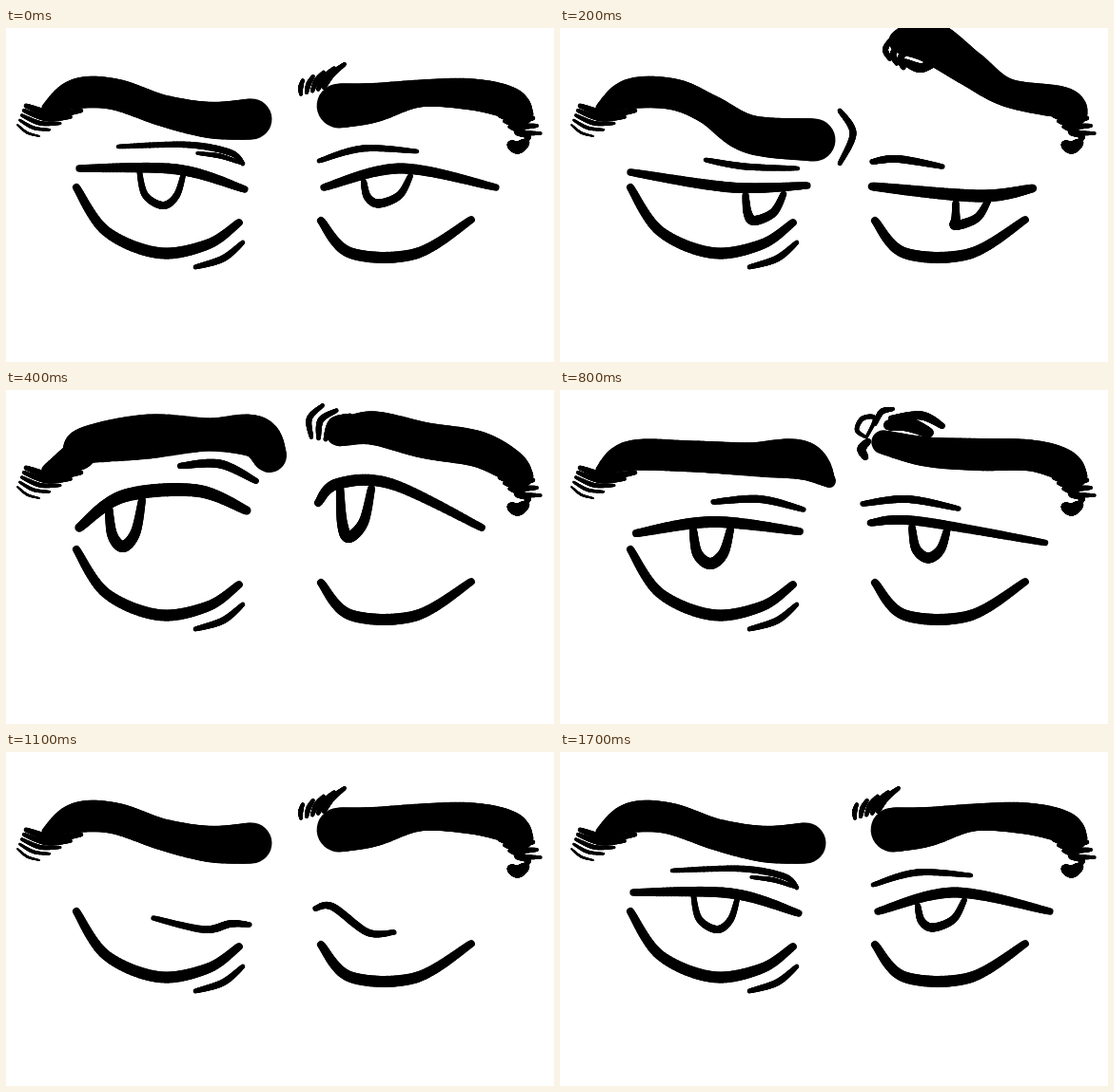
These frames come from a looping animation (576x352 px, 3600 ms). An HTML page with a canvas:

```html
<!DOCTYPE html>
<html lang="en">
<head>
<meta charset="utf-8">
<title>Expressive eyes</title>
<style>
html, body { margin: 0; width: 100%; height: 100%; overflow: hidden; background: #fff; }
canvas { display: block; width: 576px; height: 352px; }
</style>
</head>
<body>
<canvas id="stage" width="576" height="352"></canvas>
<script>
const ctx = document.getElementById('stage').getContext('2d');
const LOOP = 3600;
const STEPS = 60;

const lerp = (a, b, t) => a + (b - a) * t;

// Catmull-Rom curve through key points, sampled at even steps.
function curve(keys, dim) {
  const last = keys.length / dim - 1;
  const key = (i, d) => keys[Math.max(0, Math.min(last, i)) * dim + d];
  return Array.from({ length: STEPS + 1 }, (_, k) => {
    const u = k / STEPS * last, i = Math.min(Math.floor(u), last - 1), t = u - i;
    return Array.from({ length: dim }, (_, d) => {
      const a = key(i - 1, d), b = key(i, d), c = key(i + 1, d), e = key(i + 2, d);
      return b + t * ((c - a) / 2 + t * (a - 2.5 * b + 2 * c - e / 2 + t * (1.5 * (b - c) + (e - a) / 2)));
    });
  });
}

// Brush line that swells to `width` in the middle.
const brush = (width, ...keys) => curve(keys, 2).map(([x, y], k) =>
  [x, y, width * (0.65 + 0.35 * Math.sin(Math.PI * k / STEPS))]);

// Heavy line whose key points carry their own thickness.
const brow = (...keys) => curve(keys, 3);

// Brows keep their outer end, only the rest of the spine moves.
const browL = (...keys) => brow(42, 84, 8, 75, 69, 31, ...keys);
const browR = (...keys) => brow(...keys, 530, 79, 33, 547, 91, 15);

// Rounded U from the left rim over the bottom to the right rim.
function iris(width, lx, ly, bx, by, rx, ry) {
  return brush(width, lx, ly, lerp(lx, bx, 0.25), lerp(ly, by, 0.7), bx, by,
    lerp(rx, bx, 0.35), lerp(ry, by, 0.7), rx, ry);
}

// Bowed hatching between a first and a last stroke.
function fan(count, widths, first, last, bow) {
  return Array.from({ length: count }, (_, i) => {
    const t = i / (count - 1);
    const [x, y, x2, y2] = first.map((v, j) => lerp(v, last[j], t));
    const mx = (x + x2) / 2 + (y2 - y) * bow, my = (y + y2) / 2 - (x2 - x) * bow;
    return brush(lerp(widths[0], widths[1], t), x, y, mx, my, x2, y2);
  });
}

const fixed = [
  brush(12, 74, 168, 105, 214, 160, 237, 212, 228, 245, 205),
  brush(12, 331, 203, 362, 237, 430, 238, 489, 202),
  brush(7, 199, 252, 228, 243, 249, 226),
  ...fan(5, [2.5, 7], [12, 102, 35, 114], [21, 82, 79, 87], -0.1),
  ...fan(3, [7, 5], [519, 92, 554, 95], [529, 104, 562, 111], -0.08),
  brush(6, 551, 96, 537, 109, 549, 114, 543, 122),
  brush(13, 531, 123, 538, 126, 546, 121)
];

const calm = {
  brows: [
    browL(115, 70, 33, 165, 87, 33, 215, 97, 38, 258, 96, 43),
    browR(350, 82, 47, 385, 79, 42, 435, 69, 29, 490, 70, 33)
  ],
  tufts: fan(5, [5, 6], [310, 70, 312, 55], [334, 63, 356, 38], 0.08)
};

const rest = {
  ...calm,
  lids: [brush(11, 77, 148, 180, 149, 251, 170), brush(11, 334, 168, 415, 148, 515, 168)],
  irises: [iris(8, 140, 150, 165, 187, 187, 152), iris(9, 376, 162, 392, 185, 425, 156)],
  creases: [
    brush(7, 118, 125, 190, 123, 235, 131, 249, 143),
    brush(7, 329, 140, 375, 127, 432, 130),
    brush(5, 201, 132, 225, 135, 246, 142)
  ]
};

const suspicious = {
  brows: [
    browL(120, 70, 33, 157, 86, 32, 200, 112, 40, 267, 118, 45),
    browR(358, 14, 24, 388, 14, 44, 430, 42, 38, 470, 68, 30)
  ],
  tufts: [
    ...fan(3, [6, 7], [347, 13, 347, 33], [364, 24, 361, 42], -0.25),
    brush(10, 363, 36, 378, 42, 392, 38)
  ],
  lids: [brush(11, 74, 152, 180, 168, 260, 166), brush(13, 328, 167, 440, 177, 497, 169)],
  irises: [iris(10, 195, 176, 204, 203, 235, 175), iris(10, 416, 184, 416, 208, 450, 182)],
  creases: [brush(7, 153, 139, 195, 146, 250, 148), brush(8, 328, 141, 355, 138, 402, 146)],
  furrow: [brush(7, 294, 87, 308, 111, 294, 143)]
};

const aloft = {
  brows: [
    browL(85, 58, 38, 150, 49, 47, 215, 47, 35, 262, 49, 44, 277, 69, 36),
    browR(350, 46, 26, 385, 40, 35, 440, 53, 38, 495, 62, 38)
  ],
  tufts: fan(3, [6, 7], [321, 50, 333, 16], [336, 52, 362, 27], 0.24),
  lids: [
    brush(14, 77, 145, 123, 112, 200, 106, 253, 127),
    brush(12, 328, 119, 348, 99, 405, 99, 500, 145)
  ],
  irises: [iris(12, 108, 124, 123, 165, 143, 116), iris(12, 351, 102, 360, 155, 384, 104)],
  creases: [brush(9, 183, 80, 225, 78, 263, 96)]
};

const alert = {
  brows: [
    browL(140, 70, 33, 200, 73, 35, 255, 74, 41, 283, 96, 14),
    browR(340, 55, 25, 385, 65, 31, 440, 68, 34, 495, 69, 33)
  ],
  tufts: [
    brush(5, 320, 49, 312, 42, 318, 30, 331, 30, 322, 50),
    brush(6, 331, 36, 338, 23, 350, 20),
    brush(9, 321, 71, 317, 62, 324, 54),
    brush(9, 348, 30, 380, 27, 402, 38),
    brush(15, 345, 37, 365, 36, 388, 45)
  ],
  lids: [brush(12, 80, 151, 160, 139, 252, 149), brush(10, 326, 140, 375, 138, 510, 161)],
  irises: [iris(12, 140, 148, 158, 183, 179, 147), iris(11, 370, 145, 387, 177, 407, 147)],
  creases: [brush(8, 161, 118, 210, 115, 256, 126), brush(8, 318, 120, 365, 115, 419, 125)]
};

const closed = {
  ...calm,
  lids: [
    brush(8, 155, 175, 208, 187, 236, 181, 256, 182),
    brush(8, 325, 165, 343, 163, 380, 190, 408, 190)
  ]
};

const half = {
  ...calm,
  lids: [brush(10, 77, 156, 190, 181, 250, 176), brush(14, 320, 168, 420, 184, 505, 177)],
  irises: [iris(10, 139, 178, 159, 204, 177, 181), iris(11, 386, 188, 403, 206, 421, 189)],
  creases: [brush(7, 174, 134, 220, 136, 265, 139), brush(7, 324, 136, 370, 142, 422, 148)]
};

// Halfway between two poses, keeping the parts they share.
function mix(a, b) {
  if (typeof a === 'number') return lerp(a, b, 0.5);
  if (Array.isArray(a)) return a.slice(0, b.length).map((v, i) => mix(v, b[i]));
  const shared = Object.keys(a).filter(key => key in b);
  return Object.fromEntries(shared.map(key => [key, mix(a[key], b[key])]));
}

const timeline = [
  [0, rest], [100, mix(rest, suspicious)], [200, suspicious], [300, mix(suspicious, aloft)],
  [400, aloft], [800, alert], [900, mix(alert, half)], [1000, half],
  [1100, closed], [1600, half], [1700, rest]
];

function drawLine(points) {
  for (let i = 1; i < points.length; i++) {
    ctx.lineWidth = points[i][2];
    ctx.beginPath();
    ctx.moveTo(points[i - 1][0], points[i - 1][1]);
    ctx.lineTo(points[i][0], points[i][1]);
    ctx.stroke();
  }
}

function drawPose(pose) {
  ctx.fillStyle = '#fff';
  ctx.fillRect(0, 0, 576, 352);
  ctx.strokeStyle = '#000';
  ctx.lineCap = 'round';
  [fixed, ...Object.values(pose)].flat().forEach(drawLine);
}

const start = performance.now();
let shown = null;
function tick() {
  const t = (performance.now() - start) % LOOP;
  const pose = timeline.filter(([at]) => at <= t).pop()[1];
  if (pose !== shown) drawPose(shown = pose);
  requestAnimationFrame(tick);
}
tick();
</script>
</body>
</html>
```
